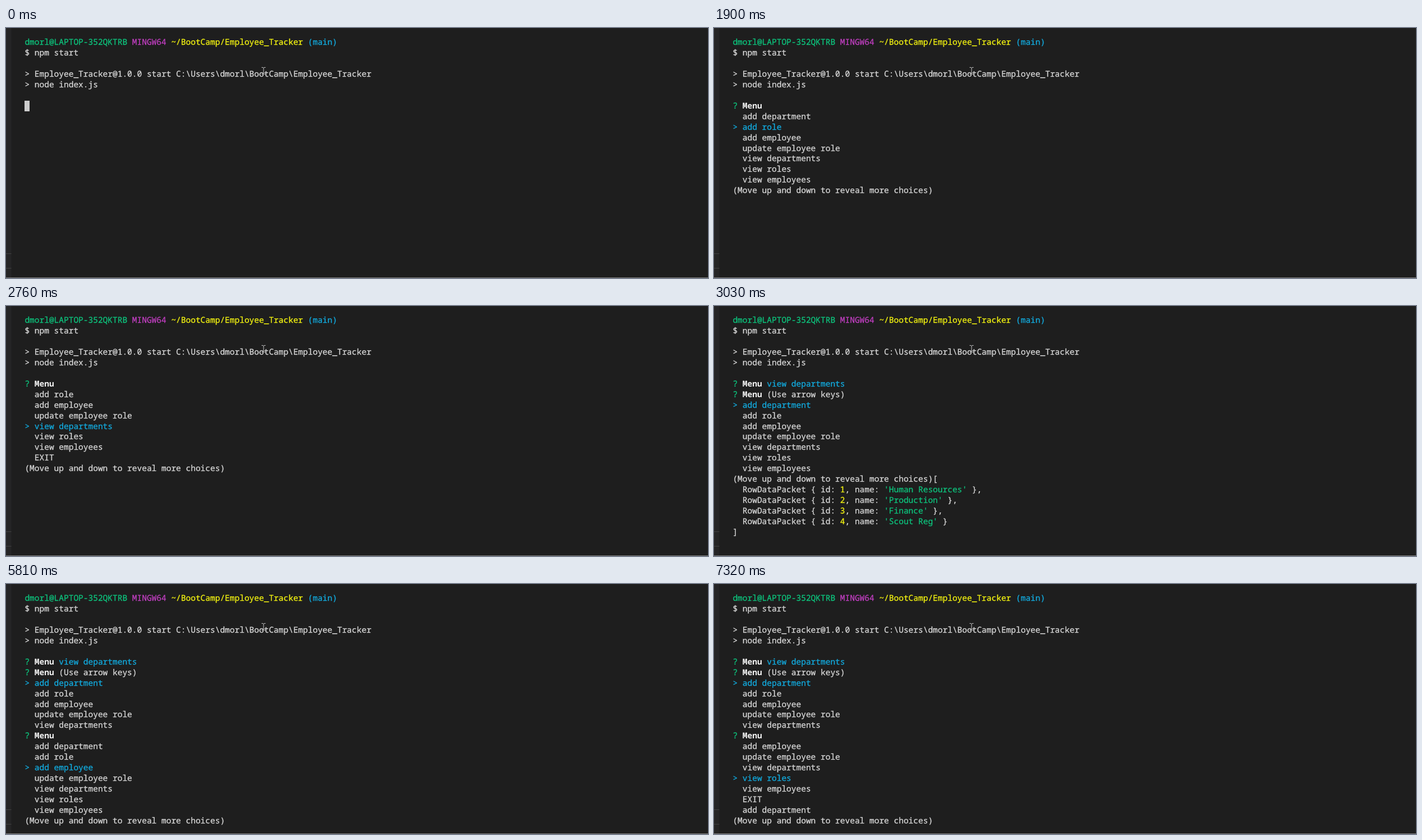
An HTML page for the animation above (8000 ms loop, 1251x447 px).

```html
<!DOCTYPE html>
<html lang="en">
<head>
<meta charset="utf-8">
<title>Terminal menu</title>
<style>
  html, body { margin: 0; width: 100%; height: 100%; overflow: hidden; background: #1e1e1e; }
  svg { display: block; width: 100%; height: 100%; }
  text {
    font-family: "Noto Sans Mono", "DejaVu Sans Mono", monospace;
    font-size: 14.5px;
    white-space: pre;
    text-rendering: geometricPrecision;
    color: #d8d8d8;
    fill: currentColor;
    stroke: currentColor;
    stroke-width: 0.3px;
  }
  .green { color: #0dc47d; }
  .magenta { color: #c23fc2; }
  .yellow { color: #f3f310; }
  .cyan { color: #12abdf; }
  .bold { color: #f5f5f5; font-weight: 700; stroke: none; }
</style>
</head>
<body>
<svg viewBox="0 0 1251 447" preserveAspectRatio="none">
  <rect width="1251" height="447" fill="#1e1e1e"/>
  <rect width="9.5" height="447" fill="#252526"/>
  <path d="M0 403.5H9.5M0 429.5H9.5" stroke="#424242"/>
  <rect y="446" width="1251" height="1" fill="#808080"/>
  <g id="screen"></g>
  <rect id="caret" x="33" y="130" width="9" height="19" fill="#cccccc"/>
  <path d="M455.5 70.5H458L459 71.5L460 70.5H462.5M459 71V81.5M455.5 82.5H458L459 81.5L460 82.5H462.5"
        fill="none" stroke="#c8c8c8"/>
</svg>
<script>
const LOOP = 8000, LEFT = 33.4, ADVANCE = 8.7, BASE = 30, PITCH = 18.95;
const NS = "http://www.w3.org/2000/svg";
const screen = document.getElementById("screen");
const caret = document.getElementById("caret");

const choices = ["add department", "add role", "add employee", "update employee role",
  "view departments", "view roles", "view employees", "EXIT"];
const departments = ["Human Resources", "Production", "Finance", "Scout Reg"];

// A line is a list of [text, style] runs.
const plain = text => [[text]];
const title = (...rest) => [["? ", "green"], ["Menu ", "bold"], ...rest];
const hint = ["(Use arrow keys)"];
const more = "(Move up and down to reveal more choices)";

const header = [
  [["dmorl@LAPTOP-352QKTRB ", "green"], ["MINGW64 ", "magenta"],
   ["~/BootCamp/Employee_Tracker ", "yellow"], ["(main)", "cyan"]],
  plain("$ npm start"),
  [],
  plain("> Employee_Tracker@1.0.0 start C:\\Users\\dmorl\\BootCamp\\Employee_Tracker"),
  plain("> node index.js"),
  []
];

// Seven visible choices; the list scrolls once the pointer reaches the fourth.
function menu(selected) {
  const first = Math.max(0, selected - 3);
  const rows = Array.from({ length: 7 }, (_, i) => {
    const n = first + i;
    const name = choices[n % choices.length];
    return n === selected ? [["> " + name, "cyan"]] : plain("  " + name);
  });
  return [selected ? title() : title(hint), ...rows];
}

const picker = selected => [...menu(selected), plain(more)];

const packet = (name, i) => [
  ["  RowDataPacket { id: "], [String(i + 1), "yellow"], [", name: "],
  [`'${name}'`, "green"], [i < departments.length - 1 ? " }," : " }"]
];

const answered = [title(["view departments", "cyan"]), ...menu(0)];
const result = [...answered, plain(more + "["), ...departments.map(packet), plain("]")];
const kept = answered.slice(0, 7);

const steps = [
  [0, []],
  [260, picker(0)],
  [1900, picker(1)],
  [2180, picker(2)],
  [2460, picker(3)],
  [2760, picker(4)],
  [3030, result],
  [4930, [...kept, ...picker(1)]],
  [5810, [...kept, ...picker(2)]],
  [6490, [...kept, ...picker(3)]],
  [6770, [...kept, ...picker(4)]],
  [7200, kept],
  [7320, [...kept, ...picker(5)]]
];

function drawLine(runs, row) {
  let col = 0;
  for (const [text, style] of runs) {
    const indent = text.length - text.trimStart().length;
    const node = document.createElementNS(NS, "text");
    node.setAttribute("x", LEFT + (col + indent) * ADVANCE);
    node.setAttribute("y", Math.round(BASE + row * PITCH));
    if (style) node.setAttribute("class", style);
    node.textContent = text.trim();
    screen.append(node);
    col += text.length;
  }
}

let shown = -1;
function render(time) {
  const index = steps.findLastIndex(([start]) => time >= start);
  if (index === shown) return;
  shown = index;
  screen.replaceChildren();
  [...header, ...steps[index][1]].forEach(drawLine);
  caret.style.display = index ? "none" : "";
}

const begun = performance.now();
function tick() {
  render((performance.now() - begun) % LOOP);
  requestAnimationFrame(tick);
}
tick();
</script>
</body>
</html>
```
